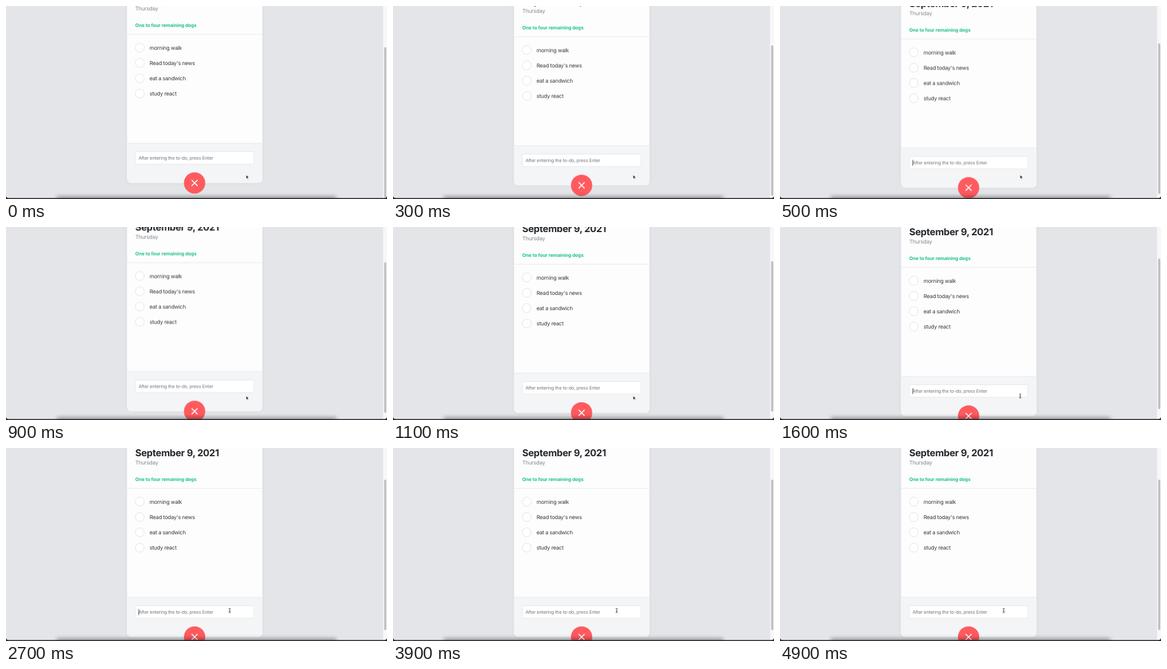
An HTML page for the animation above (5 s loop, 600 by 304 pixels).

```html
<!DOCTYPE html>
<html lang="en">
<head>
<meta charset="utf-8">
<title>To-do list</title>
<style>
  html, body { margin: 0; width: 100%; height: 100%; overflow: hidden; background: #e3e5e9; }
  svg { display: block; width: 600px; height: 304px; }
  text { font-family: Inter, Roboto, sans-serif; fill: #343a40; text-rendering: geometricPrecision; }

  .title { font-size: 15px; font-weight: 700; letter-spacing: -.02em; fill: #25292e; }
  .day, .item { font-size: 8.5px; letter-spacing: -.03em; }
  .day { fill: #82888f; }
  .left { font-size: 7.5px; font-weight: 700; letter-spacing: -.015em; fill: #20c18c; }
  .hint { font-size: 7.28px; letter-spacing: -.025em; fill: #757575; }
  .check { fill: #fff; stroke: #ced4da; stroke-width: .6; }
  .rule { stroke: #e6e8eb; stroke-width: .8; }

  .page, .thumb, .mouse, .arrow, .beam { animation: 5s linear infinite; }
  .page { --far: 1; animation-name: scroll; }
  .thumb { --far: -.79; animation-name: scroll; }
  .mouse { animation-name: move; }
  .arrow { animation-name: arrow; }
  .beam { animation-name: beam; }
  .caret { animation: blink 1s step-end infinite; }

  /* The picture advances once every 100 ms (2%). */
  @keyframes scroll {
    0% { transform: translateY(calc(var(--far) * -19px)); }
    4% { transform: translateY(calc(var(--far) * -19px)); animation-timing-function: steps(4, start); }
    12% { transform: translateY(calc(var(--far) * -11.5px)); animation-timing-function: steps(4, start); }
    20% { transform: translateY(calc(var(--far) * -7.4px)); animation-timing-function: steps(4, start); }
    28% { transform: translateY(calc(var(--far) * -2.7px)); animation-timing-function: steps(3, start); }
    34%, 100% { transform: none; }
  }
  @keyframes move {
    0% { transform: translate(378.3px, 266.2px); }
    40% { transform: translate(378.3px, 266.2px); animation-timing-function: steps(6, start); }
    52%, 100% { transform: translate(352.3px, 256px); }
  }
  @keyframes arrow {
    0% { opacity: 1; animation-timing-function: step-end; }
    30%, 100% { opacity: 0; }
  }
  @keyframes beam {
    0% { opacity: 0; animation-timing-function: step-end; }
    30%, 100% { opacity: 1; }
  }
  @keyframes blink {
    0% { opacity: 0; }
    40% { opacity: 1; }
    90%, 100% { opacity: 0; }
  }
</style>
</head>
<body>
<svg viewBox="0 0 600 304">
  <defs>
    <filter id="soft" x="-10%" y="-200%" width="120%" height="500%">
      <feGaussianBlur stdDeviation="3"/>
    </filter>
    <clipPath id="card"><rect x="190.6" y="-60" width="213.2" height="357.6" rx="6.6"/></clipPath>
  </defs>
  <rect width="600" height="304" fill="#e3e5e9"/>

  <g class="page">
    <rect x="190.6" y="-60" width="213.2" height="357.6" rx="6.6" fill="#000" opacity=".05" filter="url(#soft)"/>
    <g clip-path="url(#card)">
      <rect x="190" y="-60" width="215" height="360" fill="#fdfdfd"/>
      <rect x="190" y="235" width="215" height="65" fill="#f4f5f7"/>
      <path class="rule" d="M190 63.6H405M190 235.2H405"/>
    </g>
    <text class="title" x="203.4" y="13">September 9, 2021</text>
    <text class="day" x="203.6" y="26.3">Thursday</text>
    <text class="left" x="203.6" y="51.7">One to four remaining dogs</text>
    <g id="items"></g>
    <rect x="203.9" y="248.4" width="186.5" height="19.6" rx=".8" fill="#fff" stroke="#dee2e6" stroke-width=".7"/>
    <text class="hint" x="208.7" y="260.7">After entering the to-do, press Enter</text>
    <path class="caret" d="M209.1 253.8V263.2" stroke="#222" stroke-width=".8"/>
    <circle cx="297" cy="297.7" r="16.8" fill="#ff5b5f"/>
    <path d="M292.3 293l9.4 9.4m0-9.4l-9.4 9.4" stroke="#fff" stroke-width="1.5"/>
  </g>

  <rect x="593.8" width="6.2" height="304" fill="#f7f7f8"/>
  <rect class="thumb" x="595.6" y="49.8" width="3.2" height="237" rx="1.6" fill="#bdbdbf"/>

  <rect x="80" y="300" width="440" height="6" fill="#000" opacity=".38" filter="url(#soft)"/>
  <path d="M0 298.5Q0 302.6 4.5 302.6H595.5Q600 302.6 600 298.5V304H0Z" fill="#242427"/>

  <g class="mouse">
    <path class="arrow" d="M0 0V5.6L1.3 4.4 2.2 6.4 3.1 6 2.2 4H4Z" fill="#000" stroke="#fff" stroke-width=".5"/>
    <path class="beam" d="M-1.5-3.3Q0-3.3 0-2.4Q0-3.3 1.5-3.3M0-2.6V2.6M-1.5 3.3Q0 3.3 0 2.4Q0 3.3 1.5 3.3M-.8 1H.8" fill="none" stroke="#222" stroke-width=".8"/>
  </g>
</svg>
<script>
  const todos = ["morning walk", "Read today's news", "eat a sandwich", "study react"];
  document.getElementById("items").innerHTML = todos.map((todo, i) => {
    const y = 84.5 + i * 24.15;
    return `<circle class="check" cx="210.7" cy="${y}" r="7"/><text class="item" x="226" y="${y + 3.1}">${todo}</text>`;
  }).join("");
</script>
</body>
</html>
```
